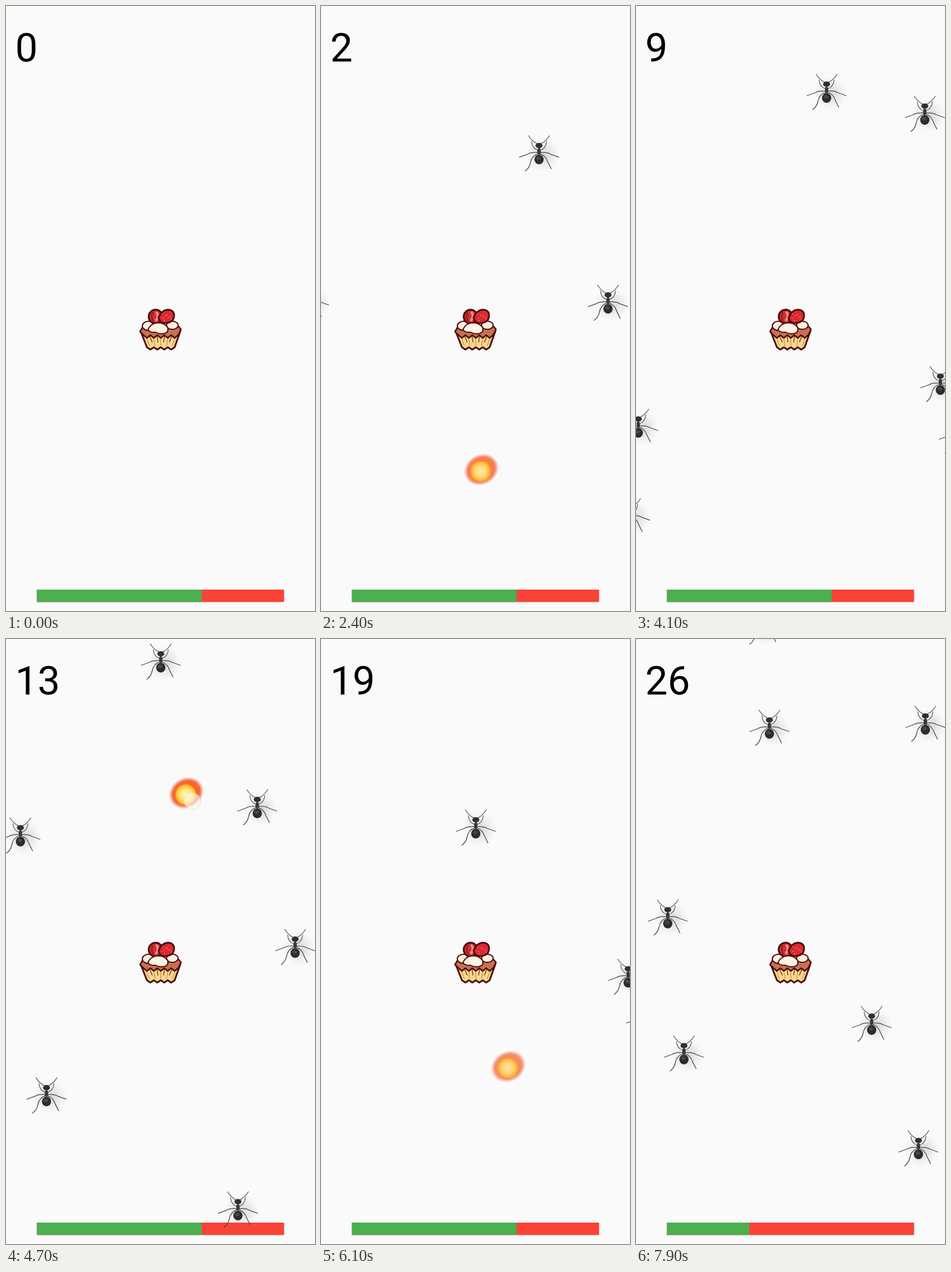
These frames come from a looping animation (535 px wide and 1046 px high, 8 s). An HTML page with a canvas:

```html
<!DOCTYPE html>
<html lang="en">
<head>
<meta charset="utf-8">
<title>Guard the tart</title>
<style>
  html, body { margin: 0; width: 535px; height: 1046px; overflow: hidden; background: #fafafa; }
  canvas { display: block; }
</style>
</head>
<body>
<canvas id="stage" width="535" height="1046"></canvas>
<script>
const ctx = document.getElementById('stage').getContext('2d');
const TAU = Math.PI * 2, LOOP = 8000, STEP = 100;
const GOAL = { x: 268, y: 559 }, SPEED = 0.205, REACH = 25, FLASH = 150, FIRST_TAP = 1700;

// Each wave: where its ants are at one moment, how many get tapped, and when the last tap falls.
const waves = [
  { seen: 1600, taps: 5, until: 3140, spots: [[243, 962], [283, 940], [433, 100]] },
  { seen: 3200, taps: 4, until: 3950, spots: [[453, 624], [56, 780], [546, 907]] },
  { seen: 4100, taps: 6, until: 5050, spots: [[527, 653], [4, 727], [559, 742], [330, 148], [500, 186]] },
  { seen: 5200, taps: 9, until: 7100, spots: [[101, 408], [137, 711], [539, 504], [371, 888], [268, 141], [738, 715]] },
  { seen: 7100, taps: 2, until: 7650, spots: [[445, 464], [510, 198], [140, 515]] },
  { seen: 7900, taps: 0, until: LOOP, spots: [[408, 665], [55, 481], [83, 716], [489, 880], [231, 153], [501, 146], [221, -22]] }
];

let seed = 7;
const random = () => (seed = seed * 16807 % 2147483647) / 2147483647;

function makeAnt(angle, distance, seen, tapped) {
  const arrive = seen + distance / SPEED, bite = arrive - REACH / SPEED;
  return { angle, arrive, end: Math.min(tapped, bite), bites: bite < tapped };
}

// Ants run straight at the tart; extra ones from the sides fill up a wave before its last tap.
function makeAnts() {
  const ants = [];
  let from = FIRST_TAP;
  for (const { seen, taps, until, spots } of waves) {
    const extras = Math.max(0, taps - spots.length);
    const tapTime = n => n <= taps ? from + (until - from) * n / taps : Infinity;
    spots.forEach(([x, y], i) => {
      const n = i + 1 + (i === spots.length - 1 ? extras : 0);
      const dx = x - GOAL.x, dy = y - GOAL.y;
      ants.push(makeAnt(Math.atan2(dy, dx), Math.hypot(dx, dy), seen, tapTime(n)));
    });
    for (let i = 0; i < extras; i++) {
      const time = tapTime(spots.length + i);
      ants.push(makeAnt(i % 2 * Math.PI + (random() - 0.5) * 0.4, 200, time, time));
    }
    from = until;
  }
  return ants;
}
const ants = makeAnts();

function path(d, fill, stroke, width = 1) {
  const p = new Path2D(d);
  if (fill) { ctx.fillStyle = fill; ctx.fill(p); }
  if (stroke) { ctx.strokeStyle = stroke; ctx.lineWidth = width; ctx.stroke(p); }
}

function oval(x, y, rx, ry, fill, stroke, width = 1) {
  ctx.beginPath();
  ctx.ellipse(x, y, rx, ry, 0, 0, TAU);
  ctx.fillStyle = fill;
  ctx.fill();
  if (stroke) { ctx.strokeStyle = stroke; ctx.lineWidth = width; ctx.stroke(); }
}

function glow(x, y, r, ...stops) {
  const g = ctx.createRadialGradient(x, y, 0, x, y, r);
  stops.forEach(([at, color]) => g.addColorStop(at, color));
  oval(x, y, r, r, g);
}

function at(x, y, draw) {
  ctx.save();
  ctx.translate(x, y);
  draw();
  ctx.restore();
}

function drawAnt() {
  const limb = '#444';
  glow(6, 3, 30, [0, 'rgba(90,90,90,.24)'], [0.5, 'rgba(110,110,110,.12)'], [1, 'rgba(150,150,150,0)']);
  for (const side of [-1, 1]) {
    ctx.save();
    ctx.scale(side, 1);
    path('M3-16 Q12-20 18-30', null, limb, 1.1);
    path('M2-5 Q12-8 13-20', null, limb, 1.1);
    path('M2-1 Q14-2 20 2 L34 7', null, limb, 1.2);
    path(side < 0 ? 'M2 1 Q13 5 15 17 Q17 26 24 31' : 'M2 1 Q12 5 15 15 L21 27', null, limb, 1.3);
    ctx.restore();
  }
  oval(0, -3, 3, 6, '#383838');
  oval(0, -13, 6, 4.6, '#303030');
  oval(0, 11, 8, 8.4, '#2c2c2c');
  oval(-1, 9, 4, 3, '#484848');
}

// Left-to-right zigzag between two heights, as path commands.
function zigzag(x0, x1, high, low, teeth) {
  let d = '';
  for (let i = 0; i <= teeth; i++) d += `L${x0 + (x1 - x0) * i / teeth} ${i % 2 ? low : high} `;
  return d;
}

function drawTart() {
  const line = '#4b0c10';
  path(`M34 3 L-35 3 ${zigzag(-24, 24, 31, 35, 8)} Z`, '#f6d88e', line, 3);
  for (let x = -4; x <= 4; x++) path(`M${x * 6.5} 11 L${x * 5} ${28 - x % 2 * x % 2 * 6}`, null, x % 2 ? '#7b3824' : '#d39c5b', 1.5);
  path(`M35 0 L30-6 L-30-6 L-36 4 ${zigzag(-30, 30, 10, 15, 10)} Z`, '#c8714f', line, 2.5);
  oval(-21, -6, 11, 8, '#fbeee0', line, 2);
  oval(20, -7, 10, 7, '#fbeee0', line, 2);
  oval(-9, -22, 12, 12, '#cf3032', line, 3);
  path('M-14-29 Q-18-22-13-14', null, '#8d1419', 2);
  path('M-7-29 Q-3-22-8-16', null, '#ee938b', 4);
  path('M-4-20 Q2-34 13-34 Q24-33 23-22 Q22-13 11-11 Q-1-9-4-20 Z', '#dc292f', line, 2.8);
  for (let i = 0; i < 8; i++) oval(3 + i * 5 % 17, -27 + i * 3 % 13, 0.8, 0.8, '#ffaaa4');
  path('M-22 0 Q-18-9-8-11 Q5-13 12-3 Q14 5 7 7 Q-2 9-9 5 Q-20 6-22 0 Z', '#fff3e5', line, 2);
}

function drawFire(age) {
  ctx.globalAlpha = 1 - Math.max(0, age - 100) / FLASH;
  ctx.save();
  ctx.rotate(-0.5);
  ctx.scale(1.08, 0.92);
  glow(0, 0, 29, [0, '#ff9428'], [0.6, '#f8651c'], [0.78, 'rgba(240,72,24,.8)'], [1, 'rgba(245,90,50,0)']);
  ctx.restore();
  glow(-1, 3, 20, [0, '#fff8c4'], [0.5, '#ffe678'], [0.8, '#ffbe38'], [1, 'rgba(252,130,28,0)']);
}

// The finger mark slides away as it fades.
function drawTap(age) {
  const fill = 0.85 * Math.max(0, 1 - age / 60);
  oval(3 + age * 0.45, 6 + age * 0.48, 14.5, 14.5, `rgba(255,250,235,${fill})`, 'rgba(190,190,190,.45)');
}

function drawBar(health) {
  const left = 53.5, width = 428;
  ctx.fillStyle = '#f94336';
  ctx.fillRect(left, 1009, width, 21.5);
  ctx.fillStyle = '#4caf50';
  ctx.fillRect(left, 1009, width * health, 21.5);
}

function render(t) {
  ctx.fillStyle = '#fafafa';
  ctx.fillRect(0, 0, 535, 1046);

  const gone = ants.filter(ant => t >= ant.end);
  const bites = gone.filter(ant => ant.bites).length;
  drawBar((2 - bites) / 3);
  at(GOAL.x, GOAL.y, drawTart);

  for (const ant of ants) {
    const age = t - ant.end;
    if (age >= FLASH || age >= 0 && ant.bites) continue;
    const distance = (ant.arrive - Math.min(t, ant.end)) * SPEED;
    at(GOAL.x + Math.cos(ant.angle) * distance, GOAL.y + Math.sin(ant.angle) * distance, () => {
      if (age < 0) return drawAnt();
      drawFire(age);
      if (age < 100) drawTap(age);
    });
  }

  ctx.fillStyle = '#000';
  ctx.font = '69px Roboto, sans-serif';
  ctx.fillText(gone.length - bites, 16, 96);
}

ctx.lineJoin = ctx.lineCap = 'round';
const start = performance.now();
function tick() {
  const t = (performance.now() - start) % LOOP;
  render(Math.floor(t / STEP) * STEP);
  requestAnimationFrame(tick);
}
tick();
</script>
</body>
</html>
```
